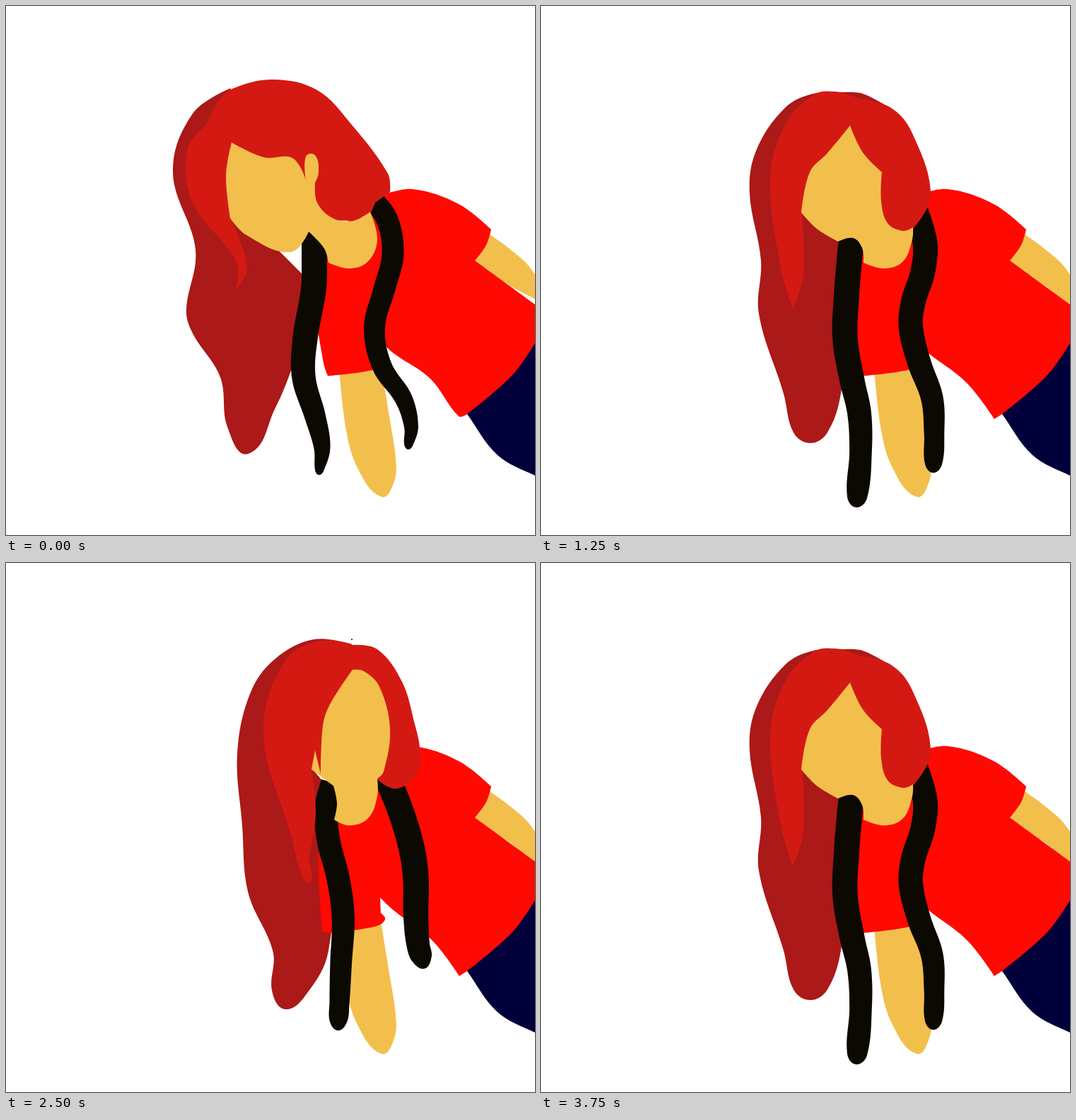
Animation, 748 px wide and 748 px high, one loop 4000 ms. Source, as an HTML page:

```html
<!DOCTYPE html>
<html lang="en">
<head>
<meta charset="utf-8">
<title>Turning head</title>
<style>
  html, body { margin: 0; width: 100%; height: 100%; overflow: hidden; background: #fff; }
  svg { display: block; width: 100%; height: 100%; }
  g { display: none; }
  g.on { display: inline; }
</style>
</head>
<body>
<svg id="stage" viewBox="0 0 748 748"></svg>
<script>
const COLOR = {
  navy: '#02003b', skin: '#f3bf4c', dark: '#ab1918',
  light: '#d41913', shirt: '#ff0903', scarf: '#0c0903'
};
const STEP = 250;

// Key points are "x,y"; a trailing * marks a sharp corner.
const parse = text => text.trim().split(/\s+/).map(token => {
  const [x, y] = token.replace('*', '').split(',').map(Number);
  return { x, y, sharp: token.endsWith('*') };
});

const heading = (a, b) => {
  const size = Math.hypot(b.x - a.x, b.y - a.y) || 1;
  return { x: (b.x - a.x) / size, y: (b.y - a.y) / size };
};
const move = (p, dir, by) => ({ x: p.x + dir.x * by, y: p.y + dir.y * by });
const pair = p => `${p.x.toFixed(1)},${p.y.toFixed(1)}`;

// Closed curve through the key points.
function outline(points) {
  const at = i => points[(i + points.length) % points.length];
  const handle = (i, reach) =>
    at(i).sharp ? at(i) : move(at(i), heading(at(i - 1), at(i + 1)), reach);
  return points.reduce((d, p, i) => {
    const q = at(i + 1), reach = Math.hypot(q.x - p.x, q.y - p.y) * 0.36;
    return `${d}C${pair(handle(i, reach))} ${pair(handle(i + 1, -reach))} ${pair(q)}`;
  }, 'M' + pair(points[0])) + 'Z';
}

// Band around a centre line that narrows toward a rounded tip.
function ribbon({ line, width, tip }) {
  const last = line.length - 1, left = [], right = [];
  let dir;
  line.forEach((p, i) => {
    dir = heading(line[Math.max(i - 1, 0)], line[Math.min(i + 1, last)]);
    const half = (width + (tip - width) * (i / last) ** 4) / 2;
    const normal = { x: dir.y, y: -dir.x };
    left.push({ ...move(p, normal, half), sharp: i === 0 });
    right.unshift({ ...move(p, normal, -half), sharp: i === 0 });
  });
  return [...left, move(line[last], dir, tip / 2), ...right];
}

const scarf = (width, tip, text) => ({ line: parse(text), width, tip });

// Swings the hanging part, more toward its end.
const sway = (points, dx, dy) => points.map(p => {
  const k = Math.max(0, (p.y - 340) / 300) ** 2;
  return { ...p, x: p.x + dx * k, y: p.y + dy * k };
});

const legs = parse('760,460* 640,560* 652,577 695,635 748,664 760,667*');
const hand = parse('470,500* 481,600 498,655 531,694 549,672 551,640 542,580 529,500*');
const shirtTop = '530,268* 575,259 640,280 686,316* 679,338 663,360* 748,422* 760,460* 748,477* 715,523 652,577*';
const shirtHem = '548,491 529,473* 530,495* 536,504 522,514 455,523*';
const arm = bottom => parse(`680,320* 735,363 760,400* 760,${bottom}* 715,397* 650,355*`);

const loose = {
  arm: arm(421),
  shirt: parse(`${shirtTop} 640,580 600,527 ${shirtHem} 449,505 437,420 440,340*`)
};
const tight = {
  arm: arm(440),
  shirt: parse(`${shirtTop} 641,584* 602,533 ${shirtHem} 447,521* 442,440 445,340*`)
};

const collar = '525,330 512,361 485,371';

const left = (tail, lock, near, far) => ({
  dark: parse(`318,116* 264,152 ${tail} 440,400* 330,290* 300,160*`),
  light: parse(`320,117 378,104 440,119 488,167 540,237 543,263* 522,278* 512,296 490,304*
    345,300* 317,300* ${lock} 283,168* 300,135`),
  skin: parse(`319,193* 365,214 405,215 424,246* 424,213 437,211 442,235 437,250* 440,278
    462,300 490,304 515,291* ${collar} 456,363* 450,343 428,319* 402,348 340,324 317,300* 311,240`),
  near, far
});

const leftA = left(
  '236,235 268,345 255,430 264,463 303,525 313,595 343,633 380,570 405,510',
  '341,370 324,403* 326,362 264,278 256,204',
  scarf(36, 12, '436,310 436,360 435,400 423,470 421,525 437,580 447,625 443,657'),
  scarf(31, 12, '512,268 538,300 547,350 535,400 521,455 532,510 562,555 573,595 569,621'));

const leftB = left(
  '240,195 238,250 268,375 275,452 303,545 318,620 345,638 370,622 383,578 408,543 425,510*',
  '331,365 326,396* 318,390* 310,355 265,280 258,220',
  scarf(36, 18, '436,310 436,360 432,400 422,470 424,535 437,590 436,630 433,656'),
  scarf(36, 14, '510,265 538,300 543,350 536,400 532,450 535,505 553,560 560,600 560,633'));

const midB = {
  dark: parse(`430,122* 385,124 345,144 304,205 295,265 311,360 308,435 343,548 357,603 381,618
    405,603 424,548 440,400* 430,320* 480,200* 490,142* 455,124`),
  light: parse(`385,126 415,121 450,131* 495,144 525,180 551,268 526,315* 500,330* 369,292*
    371,380 356,429* 339,370 324,245 345,168`),
  skin: parse(`437,169* 455,207 482,235* 481,275 490,307 512,318 526,313* ${collar} 456,363*
    454,342 441,328 420,333* 390,315 368,292* 380,235 405,208`),
  near: scarf(36, 28, '440,322 436,360 432,410 430,470 440,530 450,575 452,630 447,695'),
  far: scarf(35, 24, '530,290 543,335 540,375 526,420 523,455 535,505 553,555 556,605 555,648')
};

const right = (tail, lock, near, far) => ({
  dark: parse(`490,115* 435,108 380,136 345,185 327,270 334,370 343,465 ${tail} 475,340*
    433,291* 400,200*`),
  light: parse(`490,116* 525,122 560,168 578,228 585,262 582,297 552,319 525,306* 446,299*
    432,292* 438,355 ${lock} 364,240 395,138 445,110`),
  skin: parse(`490,151* 506,153 528,175 543,235 534,295 525,305* ${collar} 464,363* 468,340
    463,315* 432,292* 437,265* 445,298* 448,230 458,200`),
  speck: parse('488,107* 490,107* 490,109* 488,109*'),
  near, far
});

const rightA = right(
  '370,550 373,605 404,632 435,612 463,562', '421,454* 386,375',
  scarf(31, 20, '462,310 452,345 453,385 467,435 479,490 481,540 479,585 479,613'),
  scarf(31, 31, '565,295 580,335 593,390 607,440 622,485 629,525'));

const rightB = right(
  '380,550 380,605 400,631 430,608 458,550', '428,418* 432,450 421,448 403,385',
  scarf(33, 24, '462,310 453,345 456,390 470,440 478,490 476,545 475,590 474,612'),
  scarf(37, 28, '535,295 556,345 573,400 580,445 581,500 585,540 591,560'));

const swung = (pose, dx, dy = 0) => ({
  ...pose,
  dark: sway(pose.dark, dx, 0),
  near: { ...pose.near, line: sway(pose.near.line, dx, dy) },
  far: { ...pose.far, line: sway(pose.far.line, dx, 0) }
});

const poses = {
  leftA: { ...leftA, ...loose },
  leftB: { ...leftB, ...tight },
  leftC: { ...swung(leftB, 5, 37), ...tight },
  midA: { ...swung(midB, 2), ...loose },
  midB: { ...midB, ...tight },
  midC: { ...swung(midB, -4), ...tight },
  rightA: { ...rightA, ...loose },
  rightB: { ...rightB, ...tight },
  rightC: { ...swung(rightB, -5, 45), ...tight }
};

const draw = pose => [
  [legs, 'navy'], [pose.arm, 'skin'], [pose.dark, 'dark'], [hand, 'skin'],
  [pose.shirt, 'shirt'], [ribbon(pose.near), 'scarf'], [ribbon(pose.far), 'scarf'],
  [pose.light, 'light'], [pose.skin, 'skin'], [pose.speck, 'light']
].map(([points, color]) =>
  points ? `<path d="${outline(points)}" fill="${COLOR[color]}"/>` : '').join('');

document.getElementById('stage').innerHTML = Object.entries(poses)
  .map(([name, pose]) => `<g id="${name}">${draw(pose)}</g>`).join('');

const order = ['left', 'mid', 'right', 'mid']
  .flatMap(side => ['A', 'B', 'C', 'B'].map(phase => side + phase));
const groups = document.querySelectorAll('g');

function tick() {
  const current = order[Math.floor(performance.now() / STEP) % order.length];
  groups.forEach(group => group.classList.toggle('on', group.id === current));
  requestAnimationFrame(tick);
}
tick();
</script>
</body>
</html>
```
